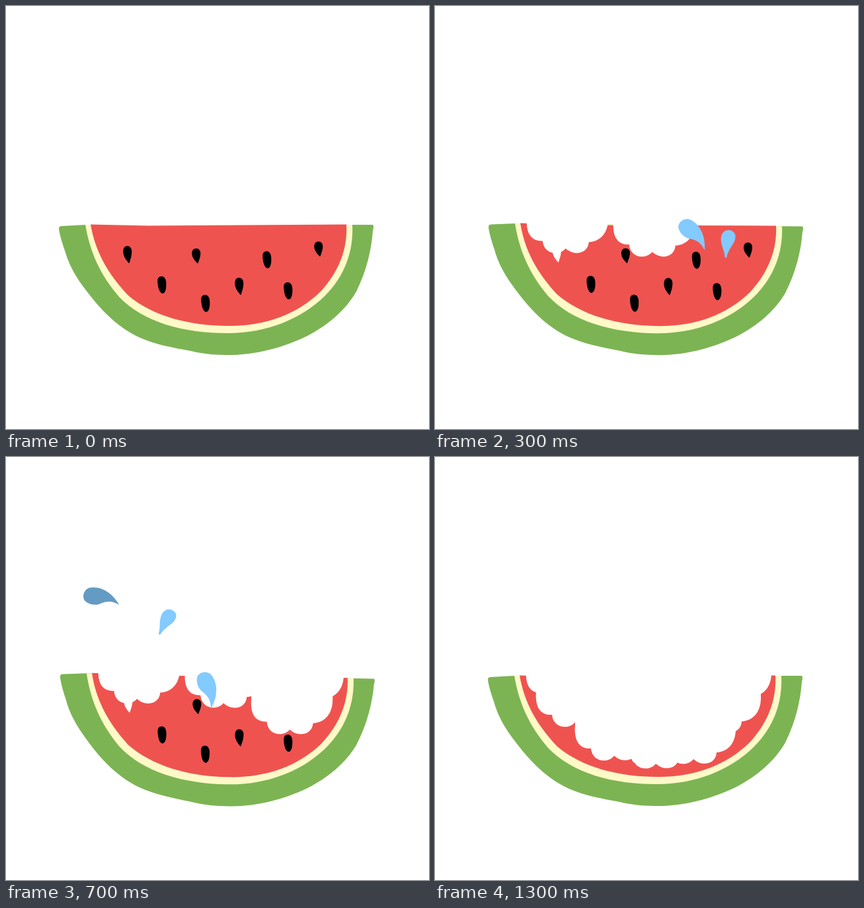
These frames come from a looping animation (640x640 px, 2.1 s). An HTML page with a canvas:

```html
<!DOCTYPE html>
<html lang="en">
<head>
<meta charset="utf-8">
<title>Watermelon</title>
<style>
  html, body { margin: 0; width: 100%; height: 100%; overflow: hidden; background: #fff; }
  canvas { display: block; width: 100vw; height: 100vh; }
</style>
</head>
<body>
<canvas id="stage" width="640" height="640"></canvas>
<script>
const ctx = document.getElementById('stage').getContext('2d');
const LOOP = 2100, STEP = 100, LAST = 13;

const rind = new Path2D('M80 337 Q80 333 84 333 L120 331 L555 331 Q557 333 555 340 C553 368 546 400 530 432 C514 460 488 482 458 498 C424 515 384 527 342 528 C318 528 300 527 280 522 C252 517 226 512 203 502 C172 488 147 464 124 434 C106 411 95 392 89 370 C84 356 81 345 80 337Z');
const pith = new Path2D('M120 331 C127 372 142 406 171 440 C208 479 270 495 335 495 C394 495 446 474 482 439 C512 409 526 372 524 331Z');
const flesh = new Path2D('M128 330.5 L215 332.5 L515 330.5 C517 366 505 400 477 431 C441 467 392 484 338 484 C276 484 222 469 185 438 C153 404 135 371 128 330.5Z');
const bite = new Path2D('M-24 -80 V-36 C-26 -12 -18 1 0 0 C2 21 26 23 35 11 C48 23 69 19 70 1 C88 0 99 -14 99 -34 V-80Z');
const pointed = new Path2D('M1 13 C-3 8 -7 2 -6.5 -5 C-6 -11 -3 -13 0 -13 C4 -13 7 -9 6.5 -4 C6 4 3 9 2 13Z');
const rounded = new Path2D('M0 13 C-5 12 -6.5 2 -6.5 -5 C-6.5 -11 -4 -13 0 -13 C4 -13 6.5 -9 6.5 -3 C6.5 4 5 13 0 13Z');
const comma = new Path2D('M9 43 C9 30 5 24 -4 17 C-12 11 -14 -1 -11 -7 C-6 -14 4 -14 9 -9 C20 4 20 24 9 43Z');
const leaf = new Path2D('M2 30 C0 21 -10 13 -10.5 1 C-10 -7 -5 -11 1 -11 C8 -11 11 -6 11 0 C11 9 4 18 5 30 Q3 32 2 30Z');

// Tilt in degrees for each step
const tilts = [0, .6, 1.2, .6, -.7, -.3, .5, 1.1, -.5, -1.8, 0, 1.4, 1.1, 0];

// First step, x, y, angle
const bites = [
  [2, 162, 357, 0], [3, 293, 361, 0], [5, 410, 361, 0],
  [6, 394, 399, 0], [8, 177, 390, 0], [9, 283, 411, -4],
  [11, 236, 441, 0], [12, 299, 453, 0], [13, 356, 446, 0]
];

// Step when eaten, x, y, shape, height scale
const seeds = [
  [2, 184, 376, pointed, 1], [9, 288, 378, pointed, .87],
  [6, 395, 384, rounded, 1], [5, 473, 367.5, pointed, .87],
  [11, 236, 422, rounded, 1], [11, 302, 450, rounded, 1],
  [9, 353, 424, pointed, 1], [13, 427, 431, rounded, 1]
];

const kinds = {
  comma: {
    path: comma, life: 3.05, fade: 2,
    x: p => -12.5 * p - 6.4 * p * p,
    y: p => -49.5 * p + 6.4 * p * p,
    turn: p => -26 * p
  },
  leaf: {
    path: leaf, life: 4.3, fade: 3,
    x: p => -4.2 * p + 4.6 * p * p,
    y: p => -26.7 * p + 1.1 * p * p,
    turn: p => 13 * p + 2 * p * p
  }
};

const drops = [
  { kind: 'comma', start: 2, x: 400, y: 378 },
  { kind: 'leaf', start: 2.1, x: 443.5, y: 373 },
  { kind: 'comma', start: 4.125, x: 183, y: 290, rate: .8, drift: .85 },
  { kind: 'leaf', start: 5, x: 236, y: 290 },
  { kind: 'comma', start: 7, x: 301, y: 338 },
  { kind: 'leaf', start: 7.4, x: 349, y: 339 }
];

function fill(path, color, x = 0, y = 0, angle = 0, sy = 1) {
  ctx.save();
  ctx.translate(x, y);
  ctx.rotate(angle * Math.PI / 180);
  ctx.scale(1, sy);
  ctx.fillStyle = color;
  ctx.fill(path);
  ctx.restore();
}

function drawMelon(step) {
  ctx.save();
  ctx.translate(318, 430);
  ctx.rotate(tilts[step] * Math.PI / 180);
  ctx.translate(-318, -430);
  fill(rind, '#7cb453');
  fill(pith, '#fff9c8');
  fill(flesh, '#ef5350');
  for (const [from, x, y, angle] of bites) {
    if (step >= from) fill(bite, '#fff', x, y, angle);
  }
  for (const [until, x, y, shape, sy] of seeds) {
    // An eaten seed leaves a hole in the flesh
    fill(shape, step < until ? '#000' : '#fff', x, y, -3, sy);
  }
  ctx.restore();
}

function drawDrop({ kind, start, x, y, rate = 1, drift = 1 }, step) {
  const k = kinds[kind];
  const p = (step - start) * rate;
  if (p < 0 || p > k.life) return;
  const light = Math.min(1, 1 - (p - k.fade) * .78);
  const color = `rgb(${[130, 202, 255].map(c => Math.round(c * light))})`;
  fill(k.path, color, x + k.x(p) * drift, y + k.y(p), k.turn(p));
}

function draw(step) {
  ctx.fillStyle = '#fff';
  ctx.fillRect(0, 0, 640, 640);
  drawMelon(step);
  for (const d of drops) drawDrop(d, step);
}

const t0 = performance.now();
function tick() {
  const t = (performance.now() - t0) % LOOP;
  draw(Math.min(LAST, Math.floor(t / STEP)));
  requestAnimationFrame(tick);
}
tick();
</script>
</body>
</html>
```
